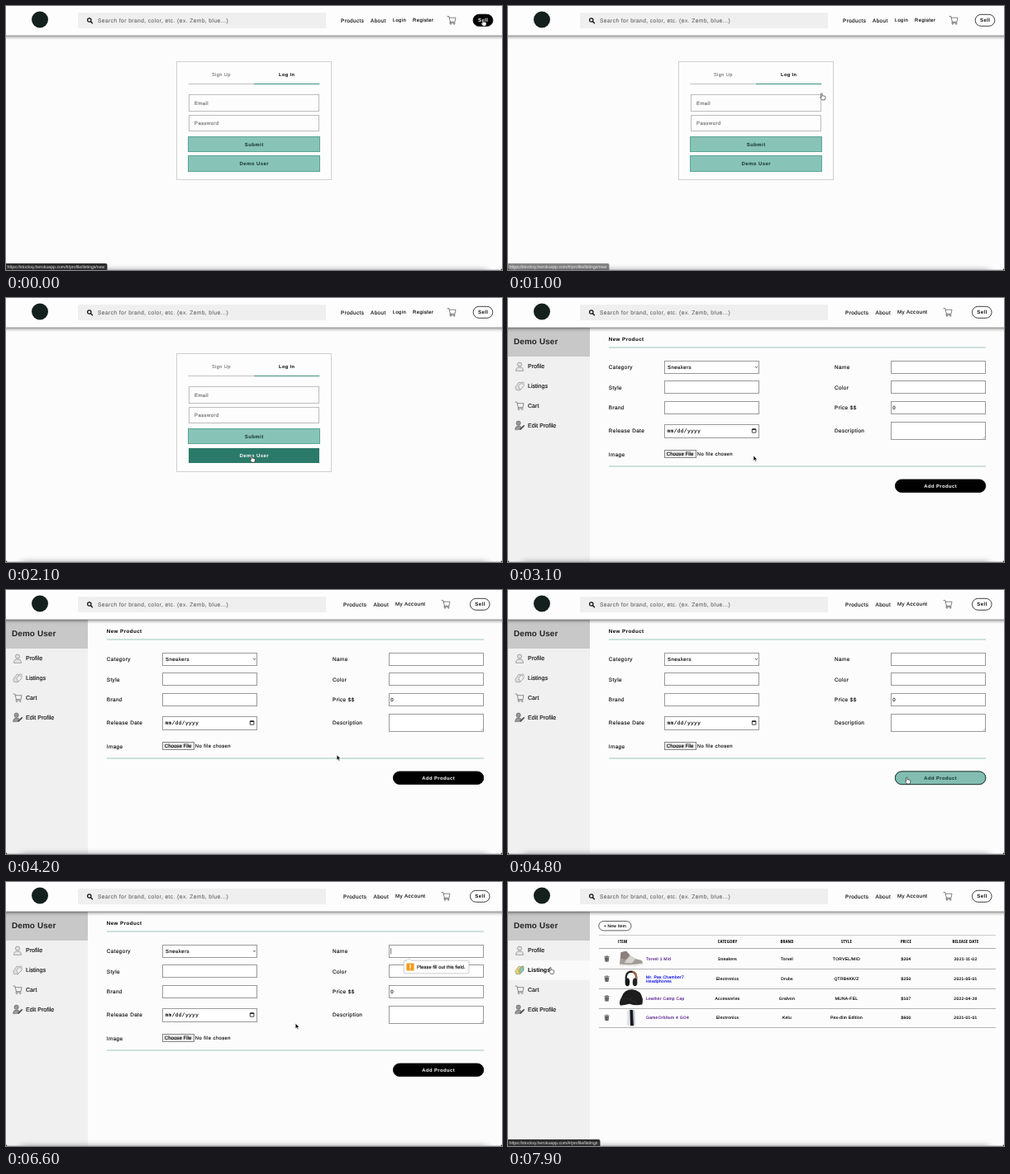
Animation of 600x320 px, one loop 8 s. Source, as an HTML page:

```html
<!DOCTYPE html>
<html lang="en">
<head>
<meta charset="utf-8">
<title>Store listing demo</title>
<style>
  html, body { margin: 0; width: 100%; height: 100%; overflow: hidden; background: #fcfcfc; }
  svg { display: block; width: 600px; height: 320px; overflow: hidden; }
  text { font-family: "Liberation Sans", Arial, sans-serif; white-space: pre; text-rendering: geometricPrecision; }
  .head { font-family: "Open Sans Condensed", "Open Sans", "Noto Sans", sans-serif; font-stretch: 75%; }
  .mono { font-family: "Liberation Mono", monospace; }
</style>
</head>
<body>
<svg id="stage" viewBox="0 0 600 320" xmlns="http://www.w3.org/2000/svg"></svg>
<script>
const LOOP = 8000;
const PAGE = '#fcfcfc', TEAL = '#2b7a69', MINT = '#88c3b8', EDGE = '#5aa595';

// ---- markup helpers ----
const text = (x, cy, str, size, { ls = 0.417, bold, mid, fill = '#111', cls = '' } = {}) =>
  `<text x="${x}" y="${cy + size * 0.35}" font-size="${size}" letter-spacing="${ls}"` +
  ` font-weight="${bold ? 700 : 400}" fill="${fill}" stroke="${fill}" stroke-width="${bold ? 0 : 0.14}"` +
  ` text-anchor="${mid ? 'middle' : 'start'}" class="${cls}">${str}</text>`;
const box = (x, y, w, h, fill, stroke = 'none', rx = 0, sw = 0.7) =>
  `<rect x="${x}" y="${y}" width="${w}" height="${h}" rx="${rx}" fill="${fill}" stroke="${stroke}" stroke-width="${sw}"/>`;
const snap = v => Math.floor(v) + 0.5;
// Outlined box with its border on whole pixels.
const frame = (x, y, w, h, fill, stroke, rx = 0) =>
  box(snap(x), snap(y), snap(x + w) - snap(x), snap(y + h) - snap(y), fill, stroke, rx, 1);
const line = (x1, x2, y, color, sw = 1) =>
  `<path d="M${x1} ${y}H${x2}" stroke="${color}" stroke-width="${sw}"/>`;
const path = (d, fill, stroke = 'none', sw = 0.8) =>
  `<path d="${d}" fill="${fill}" stroke="${stroke}" stroke-width="${sw}" stroke-linejoin="round" stroke-linecap="round"/>`;
const dot = (x, y, r, fill, stroke = 'none', sw = 0.8) =>
  `<circle cx="${x}" cy="${y}" r="${r}" fill="${fill}" stroke="${stroke}" stroke-width="${sw}"/>`;
const group = (id, body) => `<g id="${id}">${body}</g>`;
const at = (x, y, body) => `<g transform="translate(${x} ${y})">${body}</g>`;

// ---- shared pieces ----
const cart = (color, sw = 0.65) =>
  path('M-5 -4.5H-3.2L-1.6 2.2H4L5 -2.8H-2.8M-1.6 2.2L-2.2 3.4H4', 'none', color, sw) +
  dot(-1, 4.7, 0.7, 'none', color, 0.6) + dot(3.2, 4.7, 0.7, 'none', color, 0.6);

const sell = (x, fill, ink) =>
  box(x, 10.3, 23.6, 14, fill, '#111', 7, 0.8) + text(x + 12, 17.3, 'Sell', 6.1, { bold: 1, mid: 1, fill: ink });

const header =
  dot(41, 16.5, 10, '#14201e') +
  box(87, 8, 300, 19, '#efefef') +
  dot(100.8, 17, 2.2, 'none', '#111', 1.2) + path('M102.5 18.8L104.4 20.8', 'none', '#111', 1.4) +
  text(111, 17.4, 'Search for brand, color, etc. (ex. Zemb, blue...)', 6.67, { fill: '#707070' });

const guestNav =
  text(405, 17.3, 'Products', 6.35) + text(441, 17.3, 'About', 6.35) +
  text(467.7, 17.1, 'Login', 5.9) + text(492, 17.1, 'Register', 5.95) +
  at(539, 17, cart('#444')) + sell(565.2, '#fdfdfd', '#111') + group('sellHover', sell(565.2, '#000', '#fff'));

const userNav =
  text(408, 17.3, 'Products', 6.35) + text(444.5, 17.3, 'About', 6.35) + text(471, 17.3, 'My Account', 6.25) +
  at(532, 17, cart('#444')) + sell(561.5, '#fdfdfd', '#111');

// ---- login page ----
const wideButton = (y, label, fill, edge, ink) =>
  frame(220.5, y, 159, 18.6, fill, edge) + text(300.2, y + 9.3, label, 6, { bold: 1, mid: 1, fill: ink });
const loginField = (y, label) =>
  frame(221.7, y, 156.8, 19.4, '#fdfdfd', '#bcbcbc') + text(228, y + 9.6, label, 6, { fill: '#707070' });

const loginPage =
  frame(206.7, 67.7, 186.8, 142.8, '#fdfdfd', '#d0d0d0') +
  text(260.3, 83.5, 'Sign Up', 5.6, { mid: 1, fill: '#7c7c7c' }) +
  text(339.7, 83.4, 'Log In', 5.6, { bold: 1, mid: 1, fill: '#000' }) +
  line(220.5, 300, 94.5, '#c0c0c0') + line(300, 379.3, 94.5, '#3c8f7f') +
  loginField(107.9, 'Email') + loginField(132, 'Password') +
  wideButton(158.2, 'Submit', MINT, EDGE, '#15322c') +
  wideButton(181.6, 'Demo User', MINT, EDGE, '#15322c') +
  group('demoHover', wideButton(181.6, 'Demo User', TEAL, PAGE, '#fff'));

// ---- sidebar ----
const person = dot(0, -2.4, 2.6, '#ddd', '#888', 0.7) + path('M-4.6 5Q-4.4 1.2 -1.4 1H1.4Q4.4 1.2 4.6 5Z', '#e4e4e4', '#888', 0.7);
const tags = (a, b, ink) =>
  path('M-5 1L-1 -4.6L4 -3.4L4.4 .6L0 5L-4 4.6Z', a, ink, 0.6) +
  path('M-1 0L3 -5L5 -4.4V0L1 4.4Z', b, ink, 0.6) + dot(3.2, -2.8, 0.6, '#fff', ink, 0.4);
const editPerson = dot(-1.4, -2.6, 2.6, '#999', '#555', 0.6) +
  path('M-5.4 5Q-5 .8 -1.4 .8Q1 .8 2 2L-.4 5Z', '#999', '#555', 0.6) + path('M1 4.8L5.2 .6', 'none', '#444', 1.5);
const sideItem = (y, label, icon, o = {}) => at(14, y, icon) + text(24, y, label, 7.08, { ls: 0, ...o });

const sidebar =
  box(0, 36, 99, 284, '#f0f0f0') + box(0, 36, 99, 35, '#c8c8c8') +
  text(7, 52.8, 'Demo User', 9.9, { ls: 0.15, bold: 1, fill: '#222' }) +
  sideItem(83, 'Profile', person) +
  sideItem(106.8, 'Listings', tags('#ddd', '#eee', '#888')) +
  sideItem(130.5, 'Cart', cart('#777', 0.8)) +
  sideItem(154.3, 'Edit Profile', editPerson) +
  group('listHover', box(0, 95, 99, 23.6, '#fafafa') +
    sideItem(106.8, 'Listings', tags('#efd06a', '#8cc4b4', '#7d8a6c'), { bold: 1, fill: '#000' }));

// ---- new product form ----
const field = (x, y, w = 114.6, h = 15) => frame(x, y, w, h, '#fff', '#999');
const label = (x, y, str) => text(x, y, str, 6.35);
const pill = (fill, edge, ink) =>
  box(468.4, 220, 109.4, 15.6, fill, edge, 7.8, 0.8) +
  text(523.2, 227.8, 'Add Product', 5.9, { bold: 1, mid: 1, fill: ink });

const formPage =
  text(121.8, 50.2, 'New Product', 6.25, { bold: 1, fill: '#000' }) +
  line(122, 578, 60, '#85b8ad', 0.8) + line(122, 578, 204, '#85b8ad', 0.8) +
  ['Category', 'Style', 'Brand'].map((s, i) => label(121.8, 83.8 + i * 24.6, s) + field(189.3, 76.2 + i * 24.5)).join('') +
  ['Name', 'Color', 'Price $$'].map((s, i) => label(395, 83.8 + i * 24.6, s) + field(463.2, 76.2 + i * 24.5)).join('') +
  text(193, 83.8, 'Sneakers', 6.1) + path('M299.3 83.2L300.5 84.5L301.7 83.2', 'none', '#222', 0.7) +
  text(465.3, 133.2, '0', 6.1) +
  label(121.8, 161, 'Release Date') + field(189.3, 153, 114.6, 16) +
  text(192.5, 161, 'mm/dd/yyyy', 6.1, { cls: 'mono', fill: '#000' }) +
  box(295.3, 158.8, 4.6, 4.4, 'none', '#111', 0.4, 0.8) + line(295.3, 299.9, 159.3, '#111', 1.2) +
  label(395, 161, 'Description') + field(463.7, 150.3, 114, 21.2) +
  path('M574.5 170.4L576.7 168.2M576 170.4L576.7 169.7', 'none', '#777', 0.4) +
  label(121.8, 189.4, 'Image') +
  frame(189.3, 184.9, 37.8, 8.8, '#ececec', '#888') +
  text(191.8, 189.3, 'Choose File', 6.1, { ls: 0, fill: '#000' }) + text(228.8, 189.3, 'No file chosen', 5.9) +
  pill('#000', '#000', '#fff') + group('addHover', pill('#82bdb1', '#183a33', '#15322c')) +
  group('caret', path('M465.6 80.4V87', 'none', '#111', 0.6)) +
  group('tip',
    path('M482.6 95.2H485L487.6 92.6L490.2 95.2H558.6Q560 95.2 560 96.6V109.4Q560 110.8 558.6 110.8H482.6Q481.2 110.8 481.2 109.4V96.6Q481.2 95.2 482.6 95.2Z', '#fff', '#aaa', 0.6) +
    box(484.4, 98.4, 9.2, 9.2, '#f39b1d', 'none', 1) +
    path('M489 100.3V103.9M489 105.8V105.9', 'none', '#fff', 1.2) +
    text(497, 102.9, 'Please fill out this field.', 5.75, { ls: 0 }));

// ---- listings page ----
const shoe =
  path('M-14 6L-12.5 -8L-6 -9.5L-1 -4Q5 .5 12 1.5Q14.5 3 14 7Q0 9.5 -14 8Z', '#a39b98') +
  path('M-12.4 -8L-6 -9.5L-2 -5L-6 1L-13 -1Z', '#8a7f7c') + path('M-6 1L-1 -4L5 0L1 5L-8 5Z', '#d8d2ce') +
  path('M-14 6.2Q0 8 14 5.2V7.4Q0 9.6 -14 8.4Z', '#efece8');
const headphones =
  path('M-5.8 4Q-8 -8.4 0 -8.8Q8 -8.4 5.8 4', 'none', '#26201f', 2.2) + path('M2 -8.6Q7 -7 6.4 0', 'none', '#c96a3a', 1.5) +
  `<ellipse cx="-4.6" cy="4" rx="2.8" ry="4.8" fill="#171717"/><ellipse cx="4.6" cy="4" rx="2.8" ry="4.8" fill="#222"/>`;
const cap =
  path('M-11 -3Q-8 -11 1 -11Q12 -10.5 14 1L13.5 7Q6 9.5 -2 6.5Q-8 8 -13 8.5Q-15 6 -13 1Z', '#1d1d1d') +
  path('M-12 0Q-2 -2 8 7', 'none', '#3a3a3a', 0.6);
const consoleBox =
  path('M-4.6 -9L-1.6 -10L-1 9.5L-5 9Z', '#dfe3e8') + path('M-1.6 -10L2.4 -9.5L3 9.5L-1 9.5Z', '#17191d') +
  path('M2.4 -9.5L4.4 -9L5 8.6L3 9.5Z', '#c5cbd3');
const trash =
  path('M-2.4 -1.7H2.4L2 3.3H-2Z', '#333') + path('M-2.8 -2.6H2.8M-.9 -3.4H.9', 'none', '#333', 0.7) +
  path('M-.9 -.7V2.4M.9 -.7V2.4', 'none', '#ccc', 0.6);

const PURPLE = '#551a8b', columns = [265.5, 337.5, 409.5, 481.5, 553.5];
const cell = (x, y, str) => text(x, y, str, 4.95, { ls: 0.3, mid: 1, fill: '#000' });
const rows = [
  [93.3, shoe, ['Torvel 1 Mid'], PURPLE, 'Sneakers', 'Torvel', 'TORVEL/MID', '$204', '2021-11-02'],
  [117.4, headphones, ['Mr. Pax Chamber7', 'Headphones'], '#0000ee', 'Electronics', 'Drubs', 'QTRB4KK/Z', '$250', '2021-05-01'],
  [141.2, cap, ['Leather Camp Cap'], PURPLE, 'Accessories', 'Gralvon', 'MUNA-FEL', '$107', '2022-04-28'],
  [164.7, consoleBox, ['GameOrbitum 4 GO4'], PURPLE, 'Electronics', 'Kelu', 'Pex-dim Edition', '$600', '2021-01-01'],
];
const heading = (x, str) => text(x, 72.3, str, 5.5, { ls: 0.25, bold: 1, mid: 1, cls: 'head', fill: '#000' });

const listPage =
  box(109.8, 47.5, 39.2, 11.4, '#fdfdfd', '#222', 5.7) + text(129.5, 53.2, '+ New Item', 4.95, { ls: 0.2, mid: 1 }) +
  line(110, 590, 64.5, '#ccc') + line(110, 590, 80.5, '#aaa') +
  heading(138.7, 'ITEM') +
  ['CATEGORY', 'BRAND', 'STYLE', 'PRICE', 'RELEASE DATE'].map((s, i) => heading(columns[i], s)).join('') +
  rows.map(([y, art, name, ink, ...cells]) =>
    at(119.5, y, trash) + at(149, y, art) +
    name.map((s, i) => text(167, y + (i - (name.length - 1) / 2) * 5.2, s, 4.95, { ls: 0.3, fill: ink })).join('') +
    cells.map((s, i) => cell(columns[i], y, s)).join('') + line(110, 590, snap(y + 12), '#b4b4b4')).join('');

// ---- browser chrome and pointer ----
const status = (id, w, url) => group(id,
  path(`M0 312H${w - 2}Q${w} 312 ${w} 314V320H0Z`, '#2c2c2c') + text(1.5, 316.2, url, 5.2, { ls: 0, fill: '#b8b8b8' }));
const site = 'https://stockxy.herokuapp.com/#/profile/listings';

const arrow = path('M0 0V6.2L1.5 4.9L2.5 7.1L3.5 6.6L2.5 4.5H4.4Z', '#000', '#fff', 0.5);
const hand = path('M-.3 .3Q.5 -.5 1.1 .4V3Q2 2.5 2.5 3.2Q3.3 2.8 3.7 3.5Q4.6 3.3 4.8 4.3Q4.9 6.4 3.9 8H.7L-1.6 4.9Q-1.4 3.9 -.3 4.6Z', '#fff', '#111', 0.6);

const stage = document.getElementById('stage');
stage.innerHTML = `
  <defs>
    <filter id="drop" x="-5%" y="-20%" width="110%" height="170%"><feDropShadow dx="0" dy="1.5" stdDeviation="2.1" flood-opacity=".62"/></filter>
    <filter id="soft" x="-5%" y="-600%" width="110%" height="1300%"><feGaussianBlur stdDeviation="5 3"/></filter>
  </defs>` +
  box(0, 0, 600, 320, PAGE) +
  group('login', loginPage) + group('side', sidebar) + group('form', formPage) + group('list', listPage) +
  `<g filter="url(#drop)">${box(-10, -5, 620, 40.2, '#fdfdfd')}</g>` +
  header + group('guest', guestNav) + group('user', userNav) +
  `<g filter="url(#soft)" opacity=".3">${box(18, 319, 564, 6, '#000')}</g>` + line(3, 597, 319.7, '#aaa', 0.6) +
  path('M0 317Q0 320 3 320H0ZM600 317Q600 320 597 320H600Z', '#222') +
  status('newUrl', 122.5, site + '/new') + status('listUrl', 111.5, site) +
  group('pointer', group('arrow', arrow) + group('hand', hand));

const parts = Object.fromEntries([...stage.querySelectorAll('g[id]')].map(g => [g.id, g]));
const fade = (id, k) => { parts[id].setAttribute('opacity', k); parts[id].style.display = k > 0 ? '' : 'none'; };
const ramp = (t, from, to) => Math.min(1, Math.max(0, (t - from) / (to - from)));
const within = (t, from, to) => t >= from && t < to;

// ---- pointer motion: time, x, y ----
const track = [
  [0, 576.3, 16.3], [540, 576.3, 16.3], [1000, 379.5, 105.7], [1420, 296.6, 191.2], [2200, 296.6, 191.2],
  [3640, 297.2, 191.2], [4200, 400, 200], [4500, 468, 214], [4720, 482, 227], [6200, 482, 227],
  [6600, 350.6, 171.6], [7100, 112, 126], [7400, 51, 103.4], [LOOP, 51, 103.4],
];
const still = (a, b) => Math.hypot(a[1] - b[1], a[2] - b[2]) < 1;
function slope(i, axis) {
  const a = track[i - 1], b = track[i], c = track[i + 1];
  if (!a || !c || still(a, b) || still(b, c)) return 0;
  return (c[axis] - a[axis]) / (c[0] - a[0]);
}
function pointerAt(t) {
  const i = Math.max(0, track.findIndex(k => k[0] > t) - 1);
  const a = track[i], b = track[i + 1], span = b[0] - a[0], u = (t - a[0]) / span;
  const s = u * u * (3 - 2 * u);
  return [1, 2].map(n => a[n] + (b[n] - a[n]) * s +
    span * u * (1 - u) * ((1 - u) * slope(i, n) - u * slope(i + 1, n)));
}

function draw(t) {
  const loggedIn = t >= 2200, listing = t >= 7700;
  fade('login', +!loggedIn);
  fade('guest', +!loggedIn);
  fade('user', +loggedIn);
  fade('side', +loggedIn);
  fade('form', +(loggedIn && !listing));
  fade('list', +listing);

  fade('sellHover', 1 - ramp(t, 640, 760));
  fade('demoHover', ramp(t, 1340, 1500));
  fade('addHover', ramp(t, 4540, 4760) - ramp(t, 6270, 6450));
  fade('listHover', +(t >= 7280));

  fade('caret', +(t >= 5450 && (t - 5450) % 1000 < 500));
  fade('tip', ramp(t, 5400, 5600));

  fade('newUrl', 1 - ramp(t, 850, 1200));
  fade('listUrl', ramp(t, 7320, 7480));

  const onLink = t < 1080 || within(t, 1230, 2200) || within(t, 4540, 6280) || t >= 7280;
  fade('hand', +onLink);
  fade('arrow', +!onLink);
  parts.pointer.setAttribute('transform', `translate(${pointerAt(t).map(v => v.toFixed(2))})`);
}

const start = performance.now();
(function tick() {
  draw((performance.now() - start) % LOOP);
  requestAnimationFrame(tick);
})();
</script>
</body>
</html>
```
